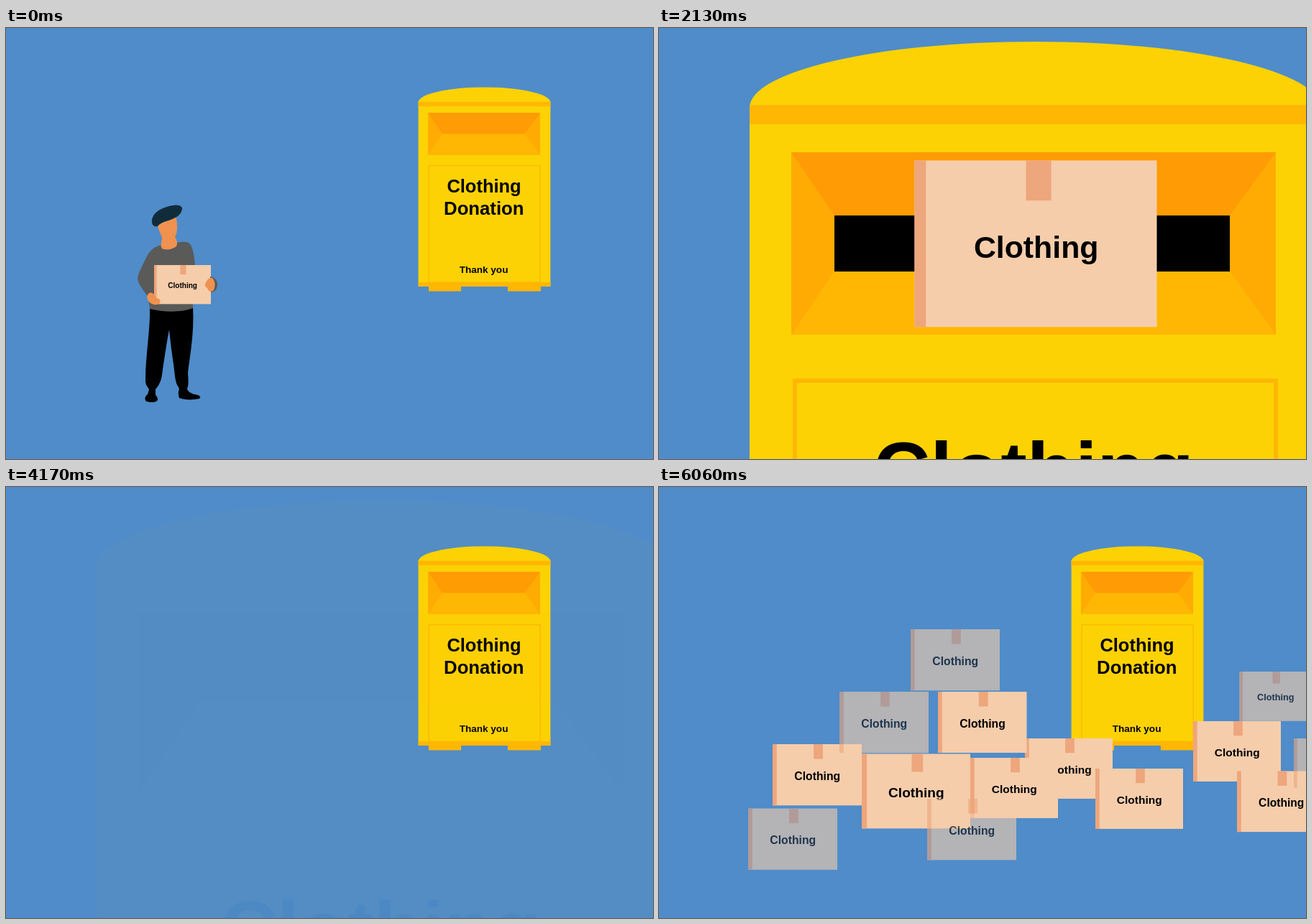
These frames come from a looping animation (900x600 px, 6.09 s). An HTML page with a canvas:

```html
<!DOCTYPE html>
<html lang="en">
<head>
<meta charset="utf-8">
<title>Clothing Donation</title>
<style>
html, body { margin: 0; width: 100%; height: 100%; overflow: hidden; background: #4f8cc9; }
canvas { display: block; width: 900px; height: 600px; }
</style>
</head>
<body>
<canvas id="stage" width="900" height="600"></canvas>
<script>
const W = 900, H = 600, LOOP = 6090;
const BLUE = '#4f8cc9', YELLOW = '#fcd205', AMBER = '#ffb703', ORANGE = '#ff9b04', SIDE = '#ffab04';
const SKIN = '#f0924f', GREY = '#5a5a59', PEACH = '#f5cdab', TAPE = '#eea67c', BROWN = '#c76850';

const main = document.getElementById('stage').getContext('2d');
let ctx = main;
const spare = [];

const clamp = v => Math.max(0, Math.min(1, v));
const ramp = (t, from, to) => clamp((t - from) / (to - from));
const ease = p => p * p * (3 - 2 * p);
const move = (t, from, to) => ease(ramp(t, from, to));
const mix = (a, b, p) => a + (b - a) * p;

// Draws a group as one flat layer with the given opacity.
function layer(alpha, draw) {
  if (alpha <= 0) return;
  if (alpha >= 1) { draw(); return; }
  const outer = ctx;
  const c = spare.pop() || Object.assign(document.createElement('canvas'), { width: W, height: H });
  ctx = c.getContext('2d');
  ctx.clearRect(0, 0, W, H);
  draw();
  ctx = outer;
  ctx.globalAlpha = alpha;
  ctx.drawImage(c, 0, 0);
  ctx.globalAlpha = 1;
  spare.push(c);
}

function placed(x, y, scale, draw) {
  ctx.save();
  ctx.translate(x, y);
  ctx.scale(scale, scale);
  draw();
  ctx.restore();
}

function rect(color, x1, y1, x2, y2) {
  ctx.fillStyle = color;
  ctx.fillRect(x1, y1, x2 - x1, y2 - y1);
}

function poly(color, ...pts) {
  ctx.fillStyle = color;
  ctx.beginPath();
  for (let i = 0; i < pts.length; i += 2) ctx.lineTo(pts[i], pts[i + 1]);
  ctx.fill();
}

function shape(color, path) {
  ctx.fillStyle = color;
  ctx.fill(path);
}

function label(str, x, y, size) {
  ctx.fillStyle = '#000';
  ctx.font = `bold ${size}px "Liberation Sans", Arial, sans-serif`;
  ctx.textAlign = 'center';
  ctx.fillText(str, x, y);
}

function box(x, y, w) {
  const h = w * 0.688;
  rect(PEACH, x, y, x + w, y + h);
  rect(TAPE, x, y, x + w * 0.047, y + h);
  rect(TAPE, x + w * 0.46, y, x + w * 0.564, y + h * 0.241);
  label('Clothing', x + w * 0.502, y + h * 0.585, w * 0.127);
}

// gap: half the height of the open slot
function bin(gap) {
  ctx.fillStyle = YELLOW;
  ctx.beginPath();
  ctx.ellipse(523, 111, 397, 92, 0, Math.PI, 2 * Math.PI);
  ctx.fill();
  rect(YELLOW, 126, 107, 920, 1218);
  rect(AMBER, 126, 107, 920, 134);

  const depth = 127 - gap;
  const l = 184 + depth * 0.682, r = 858 - depth * 0.727, top = 300 - gap, low = 300 + gap;
  rect(SIDE, 184, 173, 858, 427);
  poly(ORANGE, 184, 173, 858, 173, r, top, l, top);
  poly(AMBER, 184, 427, 858, 427, r, low, l, low);
  if (gap > 0) rect('#000', l, top, r, low);

  ctx.strokeStyle = AMBER;
  ctx.lineWidth = 6;
  ctx.strokeRect(189, 491, 669, 702);
  rect(AMBER, 126, 1192, 920, 1218);
  rect(AMBER, 188, 1218, 383, 1246);
  rect(AMBER, 663, 1218, 862, 1246);
  label('Clothing', 521, 653, 110);
  label('Donation', 520, 787, 111);
  label('Thank you', 519, 1136, 58.5);
}

const smallBin = () => placed(544.4, 78, 0.2315, () => bin(0));

const beret = new Path2D('M203 271C202 258 215 250 232 247C241 245 246 249 245 252C244 260 236 265 226 268C219 270 214 272 211 276C206 277 204 275 203 271Z');
const head = new Path2D('M211 276C214 271 222 270 236 262C238 268 238 274 238 279C238 285 236 289 235 291C238 296 239 300 237 304C232 308 222 310 217 307C214 303 217 296 217 291C214 286 213 281 211 276Z');
const sweater = new Path2D('M217 302C204 304 198 313 194 322C189 332 184 342 183 348C183 356 192 366 198 375L200 391C220 396 245 396 260 390L261 330L263 330C262 318 260 303 254 299C249 297 243 298 237 299Z');
const legs = new Path2D('M200 388C201 420 194 455 194 490C194 498 197 499 199 503L197 510C192 513 193 519 196 520C202 522 211 521 211 517C211 513 208 512 208 510L208 503C216 494 217 485 218 475C221 455 224 435 227 420C229 440 231 455 233 468C235 482 235 494 240 500L241 503C239 506 240 512 241 515C248 518 260 518 269 516C272 514 270 511 262 510C256 508 252 505 252 502C254 497 254 493 253 480C256 455 262 425 260 388C240 396 215 396 200 388Z');
const nearHand = new Path2D('M198 370C203 366 207 371 209 376C213 376 216 379 214 383C211 386 204 386 200 382C196 379 195 373 198 370Z');
const cuff = new Path2D('M284 346C291 347 295 353 294 359C293 365 289 368 285 368Z');
const farHand = new Path2D('M287 348C291 351 292 361 288 366C284 368 281 366 280 362C276 360 276 356 279 353C280 349 284 347 287 348Z');

function man(p) {
  placed(332.5 * p, -36.3 * p, mix(1, 0.867, p), () => {
    shape('#000', legs);
    shape(GREY, sweater);
    shape(SKIN, head);
    shape('#102c3a', beret);
    box(206, 330, 79);
    shape(SKIN, nearHand);
    shape(GREY, cuff);
    shape(SKIN, farHand);
  });
}

const palm = new Path2D('M509 296C520 306 540 304 551 298L553 312C554 325 552 338 549 350C547 354 548 358 545 360C537 363 521 362 515 358C510 350 504 341 499 330L511 322Z');
// tip x, y, base x, y, tip radius, base radius
const fingers = [
  [555.5, 286, 549, 318, 3.8, 5.5], [542.5, 269, 539, 312, 4.2, 6], [529.5, 264, 530, 312, 4.3, 6.5],
  [513.5, 270, 519, 314, 4.7, 6.5], [489.5, 306.5, 511, 335, 4, 7]
];

function finger(x1, y1, x2, y2, r1, r2) {
  const a = Math.atan2(y2 - y1, x2 - x1) + Math.PI / 2;
  ctx.beginPath();
  ctx.arc(x1, y1, r1, a, a + Math.PI);
  ctx.arc(x2, y2, r2, a + Math.PI, a + 2 * Math.PI);
  ctx.fill();
}

function hand(scale) {
  placed(524 * (1 - scale), 300 * (1 - scale), scale, () => {
    shape(BROWN, palm);
    fingers.forEach(f => finger(...f));
  });
}

function closeUp(t) {
  const open = move(t, 1260, 1680), shut = move(t, 3010, 3740);
  bin(39 * open * (1 - shut));
  const push = move(t, 2720, 3400);
  const w = mix(337, 188, push);
  layer(ramp(t, 1500, 1920) * (1 - ramp(t, 2940, 3322)), () => box(524 - w / 2, 300.3 - w * 0.344, w));
  layer(ramp(t, 2420, 2720) * (1 - ramp(t, 3380, 3680)), () => hand(mix(1.2, 0.99, push)));
}

// start time, then boxes as x, y, width
const piles = [
  [4800, [[509, 350, 122], [433, 377, 122], [607, 392, 122], [743, 326, 122]]],
  [5290, [[158, 358, 124], [282, 371.5, 151], [388, 285, 123.5], [804, 395.5, 123]]],
  [5780, [[350, 198, 124], [251, 285, 124], [124, 447.5, 124], [373, 434, 124], [807.5, 257, 100], [883, 350, 100]]]
];

function draw(t) {
  rect(BLUE, 0, 0, W, H);
  smallBin();
  if (t < 1300) man(move(t, 0, 720));
  layer(ramp(t, 735, 1195) * (1 - ramp(t, 3722, 4182)), () => closeUp(t));
  for (const [start, list] of piles) {
    layer(ramp(t, start, start + 460), () => list.forEach(b => box(...b)));
  }
}

const began = performance.now();
function tick() {
  draw((performance.now() - began) % LOOP);
  requestAnimationFrame(tick);
}
tick();
</script>
</body>
</html>
```
